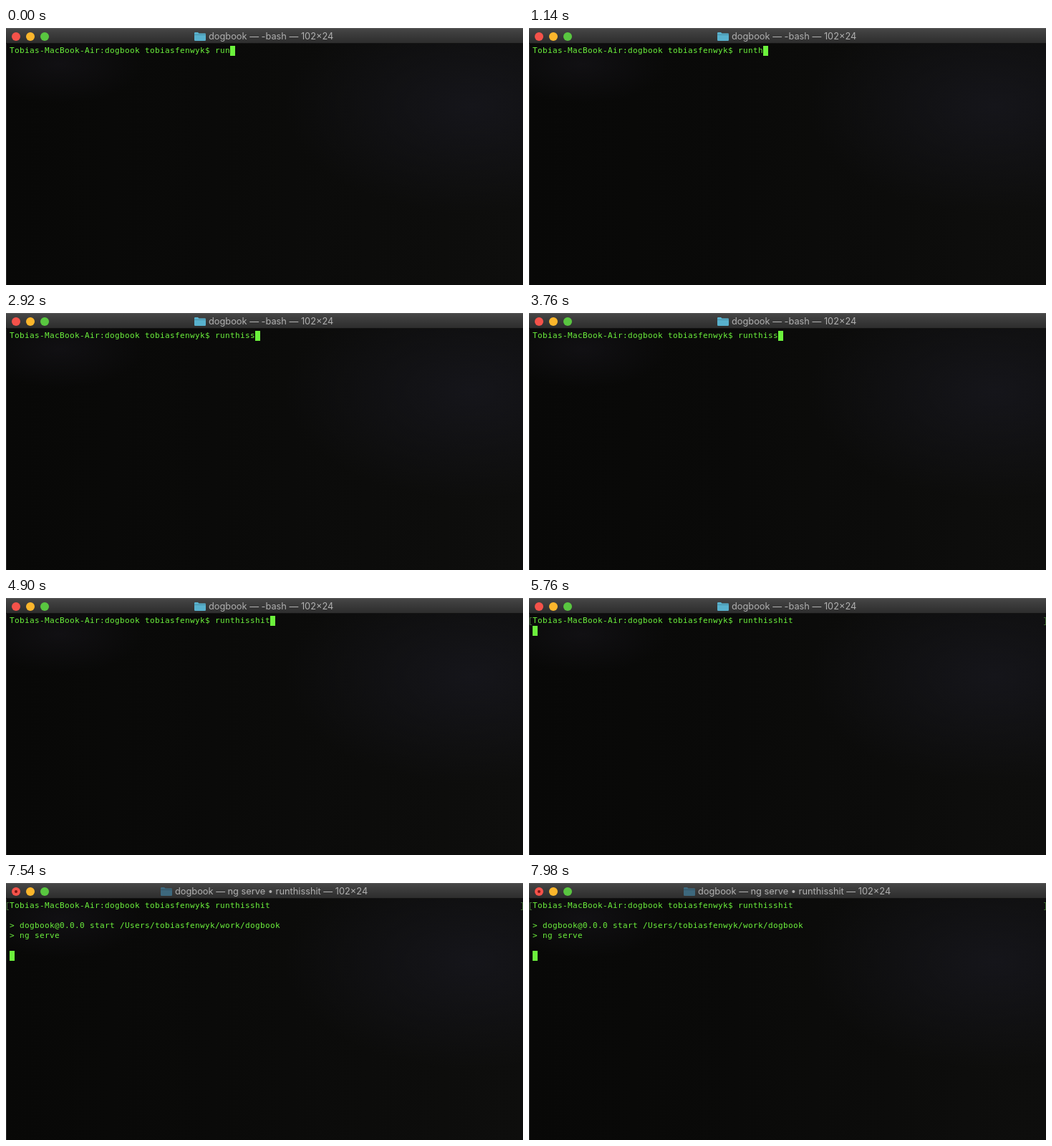
An HTML page that plays this animation: 722 px wide and 360 px high, repeating every 8 s.

```html
<!DOCTYPE html>
<html lang="en">
<head>
<meta charset="utf-8">
<title>Terminal</title>
<style>
  html, body { margin: 0; width: 100%; height: 100%; overflow: hidden; background: #000; }
  #window {
    position: absolute; left: 0; top: 0; width: 722px; height: 360px; overflow: hidden;
    background:
      radial-gradient(ellipse 120px 55px at 75px 50px, #111013, #11101300),
      radial-gradient(ellipse 260px 150px at 650px 110px, #15151a, #15151a00),
      linear-gradient(90deg, #080807, #0a0a09 40%, #0e0e0d);
  }
  #window * { position: absolute; box-sizing: border-box; }
  .edge { left: 0; top: 22px; width: 1px; height: 338px; background: #2b2b2a; }
  #bar {
    left: 0; top: 0; width: 722px; height: 22px;
    background: linear-gradient(#464646, #3a3a3a 45%, #2d2d2d);
    border-top: 1px solid #5b5b5b; border-bottom: 1px solid #131313;
  }
  .light { top: 6px; width: 12px; height: 12px; border-radius: 50%; }
  #dot { left: 4px; top: 4px; width: 4px; height: 4px; border-radius: 50%; background: #7a1512; }
  #folder { top: 6px; width: 16px; height: 12px; color: #58b1cd; }
  #folder.busy { color: #3d687d; }
  #title {
    top: 3px; height: 18px; line-height: 18px; white-space: pre; color: #b0b0b0;
    font-family: Inter, Roboto, sans-serif; font-size: 12.8px;
  }
  .row {
    left: 5px; height: 14px; line-height: 14px; white-space: pre; color: #6cf23c;
    font-family: "DejaVu Sans Mono", "Noto Sans Mono", monospace;
    font-size: 11px; letter-spacing: .378px;
  }
  #cursor { width: 7.5px; height: 14px; background: #6cf23c; }
  .mark { top: 27px; width: 3px; height: 11px; border: 1px solid #3f6a34; }
  #open { left: 1px; border-right: 0; }
  #close { left: 719px; border-left: 0; }
</style>
</head>
<body>
<div id="window">
  <div id="bar"></div>
  <div class="edge"></div>
  <div class="light" style="left:8px;background:#f4524a"><div id="dot"></div></div>
  <div class="light" style="left:28px;background:#fbb62c"></div>
  <div class="light" style="left:48px;background:#59c640"></div>
  <svg id="folder" viewBox="0 0 16 12">
    <path d="M0 1.2Q0 0 1.2 0H5L6.5 1.5H14.8Q16 1.5 16 2.7V10.8Q16 12 14.8 12H1.2Q0 12 0 10.8Z" fill="currentColor"/>
    <path d="M0 3.5H16" stroke="#000" stroke-opacity=".18"/>
  </svg>
  <div id="title"></div>
  <div id="cursor"></div>
  <div id="open" class="mark"></div>
  <div id="close" class="mark"></div>
  <div id="prompt" class="row" style="top:25px"></div>
  <div id="output" class="row" style="top:53px"></div>
</div>
<script>
  const LOOP = 8000, CELL = 7, ROW = 14, LEFT = 4.5, TOP = 24.5;
  const PROMPT = "Tobias-MacBook-Air:dogbook tobiasfenwyk$ ";
  const COMMAND = "runthisshit";
  const OUTPUT = "> dogbook@0.0.0 start /Users/tobiasfenwyk/work/dogbook\n> ng serve";
  const KEY_TIMES = [420, 840, 1260, 1680, 2920, 4040, 4340, 4640];
  const ENTER = 5460, PRINT = 6900;
  const TITLES = [
    { at: 0, x: 263, text: "-bash" },
    { at: 5900, x: 227, text: "node • runthisshit" },
    { at: 7200, x: 216, text: "ng serve • runthisshit" }
  ];
  const el = Object.fromEntries([...document.querySelectorAll("[id]")].map(n => [n.id, n]));

  function setText(node, text) {
    if (node.textContent !== text) node.textContent = text;
  }

  function show(node, visible) {
    node.style.visibility = visible ? "visible" : "hidden";
  }

  function draw(t) {
    const title = TITLES.findLast(s => t >= s.at);
    const busy = title !== TITLES[0];
    const entered = t >= ENTER, printed = t >= PRINT;
    const line = PROMPT + COMMAND.slice(0, 3 + KEY_TIMES.filter(k => t >= k).length);

    setText(el.title, `dogbook — ${title.text} — 102×24`);
    el.folder.style.left = title.x + "px";
    el.title.style.left = title.x + 20 + "px";
    el.folder.classList.toggle("busy", busy);
    show(el.dot, busy);

    setText(el.prompt, line);
    setText(el.output, printed ? OUTPUT : "");
    show(el.open, entered);
    show(el.close, entered);

    const column = entered ? 0 : line.length;
    const row = printed ? 5 : entered ? 1 : 0;
    el.cursor.style.left = LEFT + column * CELL + "px";
    el.cursor.style.top = TOP + row * ROW + "px";
  }

  const start = performance.now();
  function tick() {
    draw((performance.now() - start) % LOOP);
    requestAnimationFrame(tick);
  }
  tick();
</script>
</body>
</html>
```
